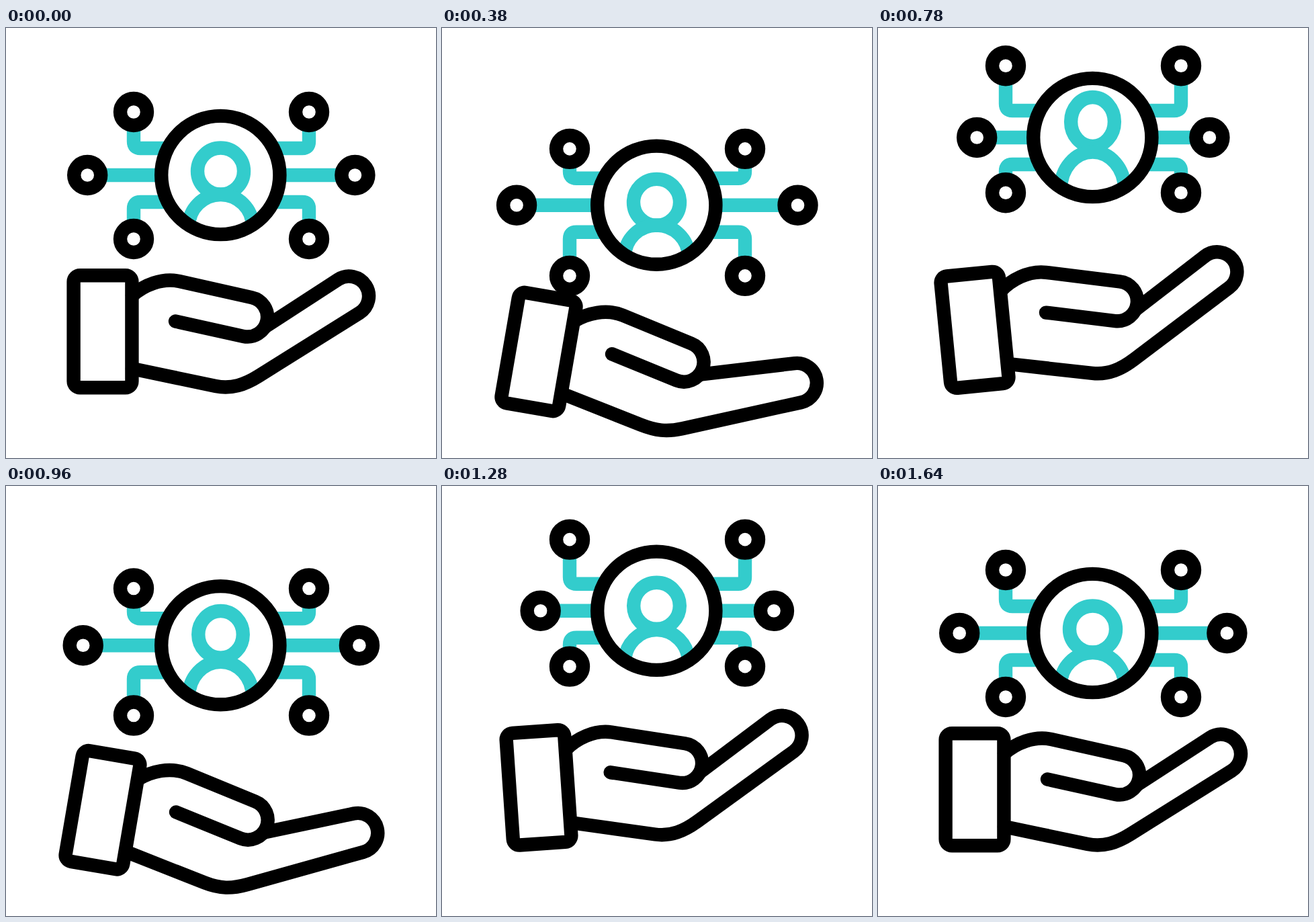
Write an HTML page that moves like this. It is 640x640 px and loops after 1.76 s.

```html
<!DOCTYPE html>
<html lang="en">
<head>
<meta charset="utf-8">
<title>Network in hand</title>
<style>
  html, body { margin: 0; width: 100%; height: 100%; overflow: hidden; background: #fff; }
  svg { display: block; width: 100vw; height: 100vh; }
  .line { fill: none; stroke: #000; stroke-width: 20.4; stroke-linecap: round; stroke-linejoin: round; }
  .teal { stroke: #3cc; stroke-linecap: butt; }
</style>
</head>
<body>
<svg viewBox="0 0 640 640">
  <g class="line teal">
    <path id="wires"/>
    <ellipse id="head" cx="319.5"/>
    <path id="body"/>
  </g>
  <g class="line">
    <circle id="ring" cx="319.3" r="88.1"/>
    <g id="nodes"></g>
    <g id="hand">
      <rect x="100.6" y="368.3" width="86.8" height="167" rx="9.5"/>
      <path d="M188 398C205 383 232 371.3 258 377L365.6 401.1A29.5 29.5 0 0 1 353.4 458.9L252 436.5"/>
      <path id="fingers"/>
    </g>
  </g>
</svg>
<script>
const LOOP = 1760, STEP = 20;
const $ = id => document.getElementById(id);
const set = (el, attrs) => { for (const k in attrs) el.setAttribute(k, attrs[k]); };

// Eased track: times and values of equal length
const track = (times, values) => t => {
  if (t <= times[0]) return values[0];
  const i = times.findIndex(x => x > t);
  if (i < 0) return values[values.length - 1];
  const u = (t - times[i - 1]) / (times[i] - times[i - 1]);
  return values[i - 1] + (values[i] - values[i - 1]) * u * u * (3 - 2 * u);
};

const handTimes = [200, 405, 738, 985, 1275, 1640];
const tilt = track(handTimes, [0, 10.2, -6.9, 10.2, -3.9, 0]);
const sink = track(handTimes, [0, 31.5, -5.3, 31.5, -2.9, 0]);
const bend = track(handTimes, [0, 1.05, 0, 0.7, 0, 0]);

const orbTimes = [200, 440, 778, 1020, 1300, 1640];
const lift = track(orbTimes, [0, 53, -56, 31.7, -34.2, 0]);
const drag = track(orbTimes, [0, 12, -12.8, 13.4, -12.5, 0]);
const spread = track(orbTimes, [0, 12, -26, 12.4, -26, 0]);
const bob = track([300, 610, 785, 1180, 1290, 1640], [0, 10.3, -17.6, 0, -1.5, 0]);

const nodes = Array.from({ length: 6 }, () => {
  const c = document.createElementNS('http://www.w3.org/2000/svg', 'circle');
  c.setAttribute('r', 20);
  return $('nodes').appendChild(c);
});

// Tangent from p to the circle (c, r); side -1 touches above, 1 below
function tangent(p, c, r, side) {
  const dx = c[0] - p[0], dy = c[1] - p[1], len = Math.hypot(dx, dy);
  const angle = Math.atan2(dy, dx) + side * Math.asin(r / len);
  const reach = Math.sqrt(len * len - r * r);
  return { angle, at: [p[0] + reach * Math.cos(angle), p[1] + reach * Math.sin(angle)] };
}

function fingerPath(m) {
  const r = 29.5, tip = [510.5 + 20 * m, 399 + 33 * m];
  const top = [387, 444], low = [376 - 2 * m, 518 + 10 * m];
  const a = tangent(top, tip, r, -1), b = tangent(low, tip, r, 1);
  const large = b.angle > a.angle ? 1 : 0;
  const grip = [low[0] - 24 * Math.cos(b.angle), low[1] - 24 * Math.sin(b.angle)];
  return `M${top}L${a.at}A${r} ${r} 0 ${large} 1 ${b.at}L${low}C${grip} 335.5 537.9 312 533L188 507`;
}

function drawOrb(t) {
  const y = 219 + lift(t), n = drag(t), s = spread(t);
  const left = 121.2 - s, right = 519.4 + s;
  const topY = y - 94 + n, lowY = y + 95 + n;
  const elbow = (x, end, dir, out) =>
    `M${x} ${end}V${y + dir * 50}Q${x} ${y + dir * 40} ${x + out * 10} ${y + dir * 40}H${x + out * 50}`;

  set($('ring'), { cy: y });
  [[190, topY], [451, topY], [left, y], [right, y], [190, lowY], [451, lowY]]
    .forEach(([cx, cy], i) => set(nodes[i], { cx, cy }));
  set($('wires'), {
    d: elbow(190, topY + 15, -1, 1) + elbow(451, topY + 15, -1, -1) +
       elbow(190, lowY - 15, 1, 1) + elbow(451, lowY - 15, 1, -1) +
       `M${left + 15} ${y}H231M${right - 15} ${y}H408`
  });

  const h = bob(t), stretch = Math.max(0, -h / 17.5);
  set($('head'), { cy: y - 6 + h, rx: 34.5 - 2.1 * stretch, ry: 34.5 + 1.9 * stretch ** 3 });
  set($('body'), { d: `M272 ${y + 76.5}A47.5 ${47.5 - 0.43 * h} 0 0 1 367 ${y + 76.5}` });
}

function draw(now) {
  const t = Math.floor(now % LOOP / STEP) * STEP;
  drawOrb(t);
  set($('hand'), { transform: `translate(0 ${sink(t)}) rotate(${tilt(t)} 144 451.7)` });
  set($('fingers'), { d: fingerPath(bend(t)) });
}

const start = performance.now();
function tick() {
  draw(performance.now() - start);
  requestAnimationFrame(tick);
}
tick();
</script>
</body>
</html>
```
